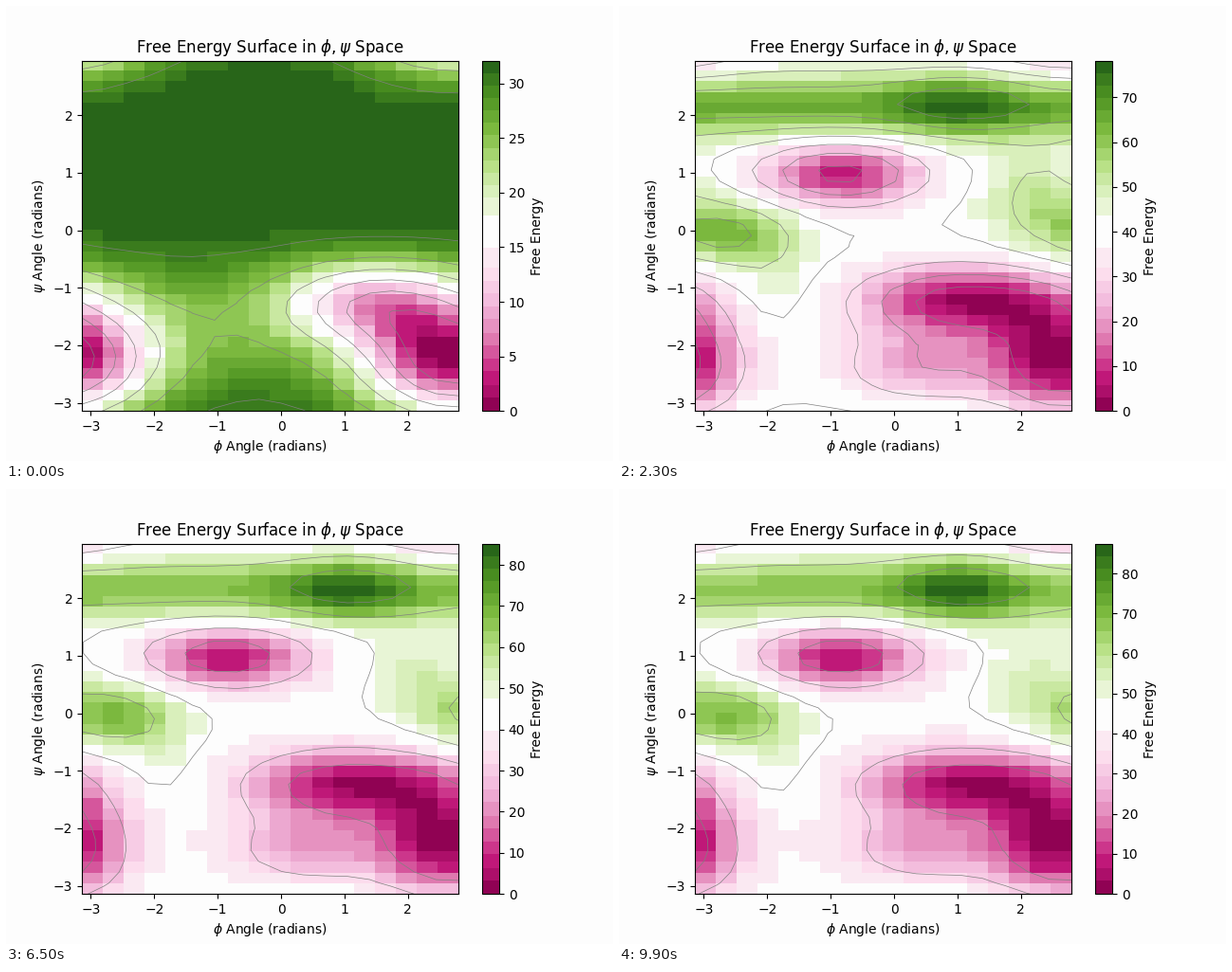
A matplotlib script for the animation above (10000 ms loop, 640 by 480 pixels).

```python
import numpy as np
import matplotlib.pyplot as plt
from matplotlib.animation import FuncAnimation
from matplotlib.colors import ListedColormap

FRAMES = 100
KNEE = 13  # frame at which the fast filling ends
PAPER = "#fdfdfd"
NX, NY = 18, 33

phi = -np.pi + 2 * np.pi * np.arange(NX) / NX
psi = -np.pi + 2 * np.pi * np.arange(NY) / NY
PHI, PSI = np.meshgrid(phi, psi)


def wrap(a):
    return (a + np.pi) % (2 * np.pi) - np.pi


def bump(x, y, sx, sy):
    """Periodic Gaussian; an infinite width gives a band."""
    return np.exp(-(wrap(PHI - x) / sx) ** 2 / 2 - (wrap(PSI - y) / sy) ** 2 / 2)


def to_range(f, top):
    f = f - f.min()
    return f * top / f.max()


def first_wells():
    f = (32.6 - 7 * bump(0, -1.7, np.inf, 0.9)
         - 18 * bump(1.5, -1.25, 1.05, 0.5)
         - 29 * bump(2.75, -2.35, 1.0, 0.7))
    return to_range(np.minimum(f, 32), 32.1)


def landscape(base, top, ridge, peak, well, left, right, scale):
    """Green ridges and the upper well, over lower wells of fixed proportions."""
    lower = (38 * bump(0.95, -1.25, 1.1, 0.45)
             + 42 * bump(2.7, -2.35, 0.75, 0.65)
             + 21 * bump(0.5, -2.4, 1.0, 0.45)
             + 12 * bump(2.4, -1.3, 0.75, 0.45)
             - 6 * bump(-1.9, -0.9, 0.4, 0.45))
    f = (base + ridge * bump(0, 2.22, np.inf, 0.4)
         + peak * bump(1.1, 2.2, 0.75, 0.4)
         - well * bump(-0.85, 1.0, 0.95, 0.4)
         + left * bump(-2.7, -0.05, 0.75, 0.42)
         + right * bump(2.3, 0.6, 0.6, 0.6)
         - scale * lower)
    return to_range(f, top)


early = first_wells()
middle = landscape(base=36, top=69.87, ridge=26, peak=7, well=30,
                   left=21, right=14, scale=0.85)
late = landscape(base=43, top=87.43, ridge=24, peak=20, well=39,
                 left=26, right=10, scale=1)


def settle(n, span, tau):
    """Logarithmic growth from 0 to 1, as hills get smaller."""
    return np.log1p(n / tau) / np.log1p(span / tau)


def energy(n):
    if n <= KNEE:
        f = early + settle(n, KNEE, 3) * (middle - early)
    else:
        f = middle + settle(n - KNEE, FRAMES - 1 - KNEE, 2) * (late - middle)
    return f - f.min()


def banded_cmap():
    """PiYG in steps, with a wide white band in the middle."""
    edges = np.concatenate([np.linspace(0, 0.41, 12), [0.465, 0.558],
                            np.linspace(0.61, 1, 12)])
    mid = (edges[1:] + edges[:-1]) / 2
    mid[0], mid[-1] = 0.005, 0.995
    colors = plt.get_cmap("PiYG")(mid)
    colors[12, :3] = 253 / 255
    x = (np.arange(256) + 0.5) / 256
    return ListedColormap(colors[np.digitize(x, edges) - 1])


fig, ax = plt.subplots(figsize=(6.4, 4.8), dpi=100, facecolor=PAPER)
start = energy(0)
image = ax.imshow(start, origin="lower", aspect="auto", cmap=banded_cmap(),
                  extent=(phi[0], phi[-1], psi[0], psi[-1]),
                  vmin=0, vmax=start.max())
fig.colorbar(image, ax=ax, label="Free Energy")
ax.set_title(r"Free Energy Surface in $\phi, \psi$ Space")
ax.set_xlabel(r"$\phi$ Angle (radians)")
ax.set_ylabel(r"$\psi$ Angle (radians)")
lines = None


def draw(n):
    global lines
    f = energy(n)
    image.set_data(f)
    image.set_clim(0, f.max())
    if lines is not None:
        lines.remove()
    lines = ax.contour(phi, psi, f, colors="gray", linewidths=0.5)
    ax.set_xlim(phi[0], phi[-1])
    ax.set_ylim(psi[0], psi[-1])
    return [image, lines]


anim = FuncAnimation(fig, draw, frames=FRAMES, init_func=lambda: [image],
                     interval=100, repeat=True, repeat_delay=0, blit=False)
plt.show()
```
